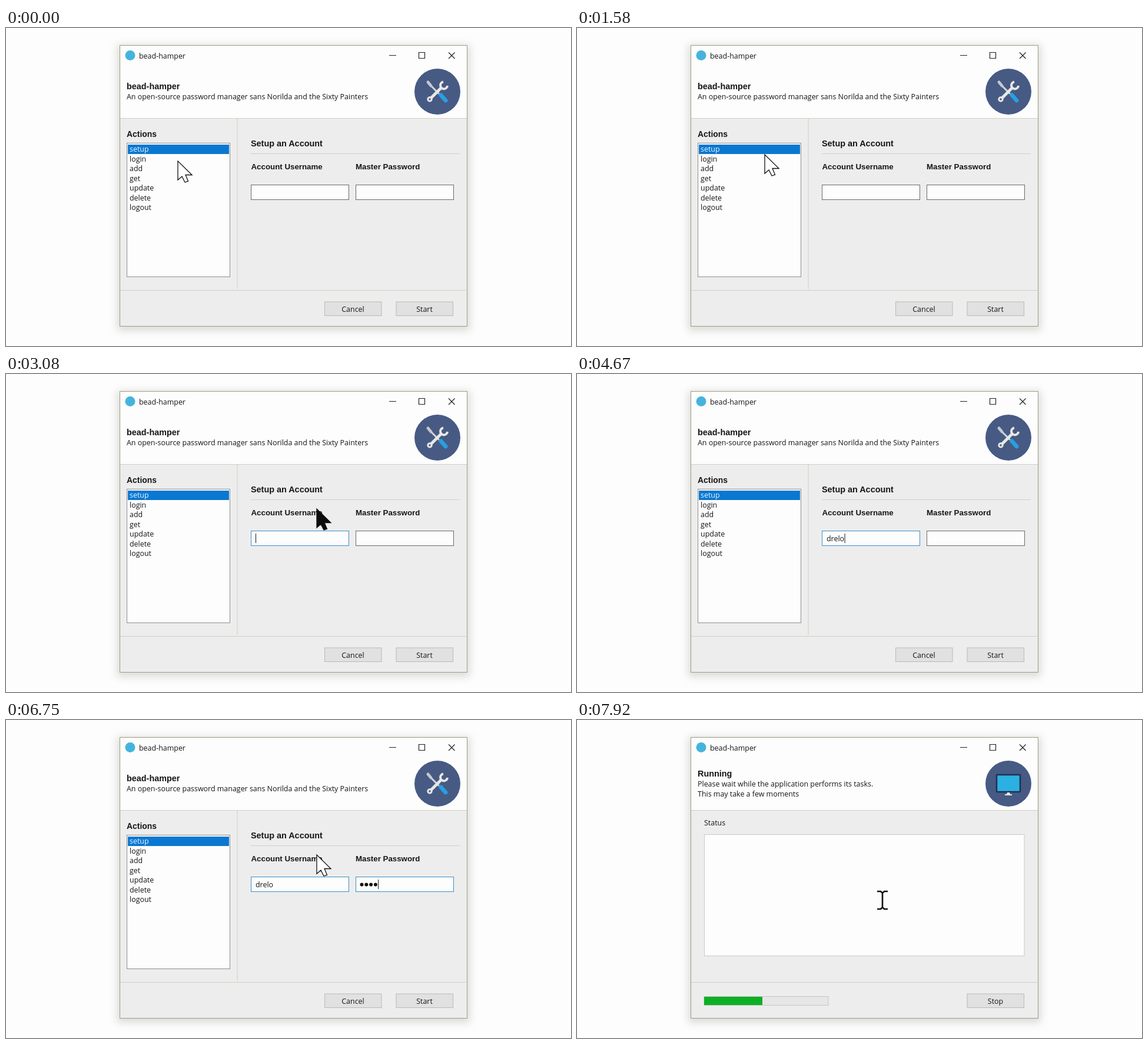
These frames come from a looping animation (960 px wide and 540 px high, 8 s). An HTML page:

```html
<!DOCTYPE html>
<html lang="en">
<head>
<meta charset="utf-8">
<title>Password manager setup</title>
<style>
  html, body { margin: 0; width: 100%; height: 100%; overflow: hidden; background: #fdfdfd; }
  svg { display: block; width: 960px; height: 540px; }
  text { font: 12.45px "Open Sans", "Noto Sans", sans-serif; fill: #161616; white-space: pre; }
  .bold { font: bold 13.3px "Liberation Sans", Arial, sans-serif; }
  .title { font-size: 14.4px; }
  .actions { font-size: 13.9px; }
  .mid { text-anchor: middle; }
  .halo { fill: #8c8c84; opacity: .3; filter: blur(7px); }
  .panel { fill: #ededed; }
  .paper { fill: #fdfdfd; }
  .rule { stroke: #cfcfc4; fill: none; }
  .list { stroke: #8d8d8d; }
  .field { stroke: #6a6a6a; }
  .field.focus { stroke: #3c8fc8; }
  .button { fill: #e1e1e1; stroke: #b9b9b4; }
  .button.hot { fill: #d9e6f1; stroke: #3a80bd; stroke-width: 2; }
  .controls { fill: none; stroke: #222; stroke-width: 1.2; }
  .caret { stroke: #161616; }
</style>
</head>
<body>
<svg viewBox="0 0 960 540">
  <rect width="960" height="540" fill="#fdfdfd"/>
  <rect class="halo" x="189" y="29" width="599" height="485"/>
  <rect class="panel" x="193.5" y="29.5" width="590" height="477" stroke="#9c9c84"/>
  <rect class="paper" x="194" y="30" width="589" height="123"/>
  <path class="rule" d="M194 153.5H783M194 445.5H782"/>

  <circle cx="211" cy="46.5" r="8.5" fill="#45b4dc"/>
  <text x="226" y="51.5">bead-hamper</text>
  <path class="controls" d="M651 46.5H663M701.5 41.5H711.5V51.5H701.5ZM752 41.5L762.5 52M762.5 41.5L752 52"/>
  <circle cx="733" cy="108" r="39" fill="#465a84"/>

  <g id="form">
    <text class="bold title" x="205" y="103.5">bead-hamper</text>
    <text x="205" y="121">An open-source password manager sans Norilda and the Sixty Painters</text>

    <g fill="none" stroke-linecap="round">
      <path d="M722 98L735 111" stroke="#d2d5da" stroke-width="3"/>
      <path d="M717 92L722 98" stroke="#c4c8ce" stroke-width="5"/>
      <path d="M739 114L747 123" stroke="#2a9fe0" stroke-width="7"/>
      <path d="M722 119L741 100" stroke="#e8e8e4" stroke-width="5" stroke-linecap="butt"/>
      <circle cx="720" cy="121" r="3.2" stroke="#e8e8e4" stroke-width="3"/>
      <path d="M743 91.5A6 6 0 1 0 750 98" stroke="#e8e8e4" stroke-width="4" stroke-linecap="butt"/>
    </g>

    <path class="rule" d="M393 154V443M416 213.5H771"/>
    <text class="bold actions" x="205" y="185">Actions</text>
    <rect class="paper list" x="205.5" y="195.5" width="175" height="227"/>
    <rect x="207" y="198" width="172" height="16" fill="#0a78d0"/>
    <g id="actions"></g>

    <text class="bold title" x="416" y="200.5">Setup an Account</text>
    <text class="bold" x="416.5" y="240">Account Username</text>
    <text class="bold" x="594" y="240">Master Password</text>
    <rect id="user" class="paper field" x="416.5" y="266.5" width="166" height="25"/>
    <rect id="pass" class="paper field" x="594.5" y="266.5" width="166" height="25"/>
    <text id="name" x="424" y="283.5"></text>
    <g id="dots" fill="#111"></g>
    <path id="caret" class="caret" d="M.5 271V287"/>

    <rect class="button" x="541.5" y="465" width="96.5" height="23.5"/>
    <text class="mid" x="589.5" y="482">Cancel</text>
    <rect id="start" class="button" x="663" y="465" width="96.5" height="23.5"/>
    <text class="mid" x="711" y="482">Start</text>
  </g>

  <g id="running">
    <text class="bold title" x="205" y="95.5">Running</text>
    <text x="205" y="113">Please wait while the application performs its tasks.</text>
    <text x="205" y="130">This may take a few moments</text>

    <rect x="713" y="93" width="40" height="29" rx="1" fill="#2cb0e2" stroke="#22304f" stroke-width="2.5"/>
    <path d="M731 123H735L736 126H739V128H727V126H730Z" fill="#e4e6e8"/>

    <text x="216" y="178.5">Status</text>
    <rect class="paper" x="216.5" y="194.5" width="543.5" height="206" stroke="#cacac4"/>
    <rect x="216" y="469.5" width="211" height="15" fill="#e6e6e6" stroke="#c6c6c0"/>
    <rect id="progress" x="216" y="470" height="14" fill="#0cb024"/>
    <rect class="button" x="663" y="465" width="96.5" height="23.5"/>
    <text class="mid" x="711" y="482">Stop</text>
  </g>

  <g id="cursor">
    <path id="arrow" d="M0 0V32L7 26 12 36 17.5 34 13 23.5H24Z" stroke="#111" stroke-width="1.3"/>
    <path id="beam" d="M-9 -15H-3L0 -12 3 -15H9M0 -12V12M-9 15H-3L0 12 3 15H9" fill="none" stroke="#111" stroke-width="2.6"/>
  </g>
</svg>
<script>
const LOOP = 8000, STEP = 1000 / 12;
const USER_FOCUS = 2600, PASS_FOCUS = 5000, RUN_AT = 7540;
const $ = id => document.getElementById(id);
const show = (id, on) => $(id).style.display = on ? "" : "none";
const within = (v, a, b) => v >= a && v < b;
const clamp = (v, max) => Math.max(0, Math.min(max, v));

// how many keys are down by time t, typed at an even pace
const keysTyped = (t, first, gap, count) => clamp(Math.floor((t - first) / gap) + 1, count);

const userName = "drelo", passLength = 4, dotGap = 7.8;

// time, x, y
const path = [
  [0, 292, 226], [1580, 319, 215], [2420, 500, 281], [2750, 500, 283],
  [3080, 528, 229], [6750, 528, 229], [7270, 691, 481],
  [7560, 691, 481], [7900, 519, 306], [LOOP, 519, 306]
];

$("actions").innerHTML = ["setup", "login", "add", "get", "update", "delete", "logout"]
  .map((word, i) => `<text x="210" y="${210.3 + 16.5 * i}"${i ? "" : ' style="fill:#eef6fc"'}>${word}</text>`).join("");
$("dots").innerHTML = Array.from({ length: passLength },
  (_, i) => `<circle cx="${604.5 + dotGap * i}" cy="279.5" r="3"/>`).join("");

function cursorAt(t) {
  const i = path.findIndex(p => p[0] > t);
  const [t0, x0, y0] = path[i - 1], [t1, x1, y1] = path[i];
  const u = (t - t0) / (t1 - t0), k = u * u * (3 - 2 * u);
  return [x0 + (x1 - x0) * k, y0 + (y1 - y0) * k];
}

function drawCursor(t, running) {
  const [x, y] = cursorAt(t);
  const overText = running
    ? within(x, 217, 760) && within(y, 195, 401)
    : within(x, 417, 583) && within(y, 266, 292);
  $("cursor").setAttribute("transform", `translate(${x} ${y})`);
  show("cursor", !within(t, 3400, 6740));
  show("arrow", !overText);
  show("beam", overText);
  $("arrow").setAttribute("fill", within(t, USER_FOCUS, PASS_FOCUS) ? "#0c0c0c" : "#fff");
}

function drawForm(t) {
  const typed = keysTyped(t, 3600, 230, userName.length);
  const masked = keysTyped(t, 6150, 165, passLength);
  $("name").textContent = userName.slice(0, typed);
  [...$("dots").children].forEach((dot, i) => dot.style.display = i < masked ? "" : "none");
  $("user").classList.toggle("focus", t >= USER_FOCUS);
  $("pass").classList.toggle("focus", t >= PASS_FOCUS);
  $("start").classList.toggle("hot", t >= 7200);

  const inUser = within(t, USER_FOCUS, PASS_FOCUS);
  const caretX = inUser ? 424 + (typed ? $("name").getComputedTextLength() + .5 : 0) : 601 + dotGap * masked;
  $("caret").setAttribute("transform", `translate(${caretX} 0)`);
  show("caret", inUser || within(t, PASS_FOCUS, PASS_FOCUS + 530) || within(t, 6640, 7170));
}

function draw(now) {
  const t = Math.floor((now % LOOP + 4) / STEP) * STEP % LOOP;
  const running = t >= RUN_AT;
  show("form", !running);
  show("running", running);
  if (running) $("progress").setAttribute("width", 99 * clamp((t - RUN_AT) / 376, 1));
  else drawForm(t);
  drawCursor(t, running);
}

const begin = performance.now();
function tick() {
  draw(performance.now() - begin);
  requestAnimationFrame(tick);
}
tick();
</script>
</body>
</html>
```
